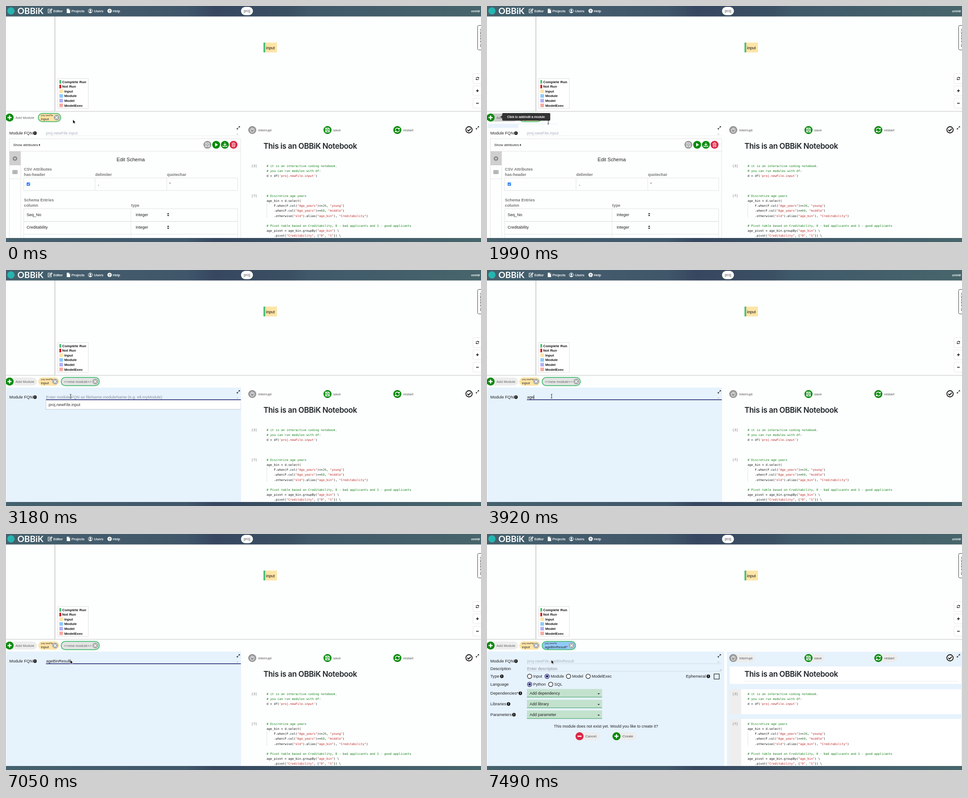
An HTML page for the animation above (8000 ms loop, 1059 by 529 pixels).

```html
<!DOCTYPE html>
<html lang="en">
<head>
<meta charset="utf-8">
<title>Notebook editor</title>
<style>
html, body { margin: 0; width: 100%; height: 100%; overflow: hidden; background: #fdfffe; }
svg { display: block; width: 100vw; height: 100vh; }
text { font-family: "Liberation Sans", Arial, sans-serif; white-space: pre; }
.b { font-weight: 700; }
.m { font-weight: 500; stroke: #fff; stroke-width: .2; }
.code { font-family: "DejaVu Sans Mono", monospace; }
.title { font-family: Inter, sans-serif; font-weight: 600; letter-spacing: -.4px; }
.brand { font-family: Lato, sans-serif; font-weight: 700; }
</style>
</head>
<body>
<svg id="stage" viewBox="0 0 1059 529"></svg>
<script>
const LOOP = 8000, GREEN = '#078a0b', RED = '#dc2647', BLUE = '#e6f2fc', NAVY = '#16166b', RING = '#52bf7c';
const stage = document.getElementById('stage');

// y is the middle of the capitals
const text = (x, y, s, size = 9, fill = '#222', more = '') =>
  `<text x="${x}" y="${(y + size * .36).toFixed(2)}" font-size="${size}" fill="${fill}" ${more}>${s}</text>`;
const rect = (x, y, w, h, fill = 'none', more = '') =>
  `<rect x="${x}" y="${y}" width="${w}" height="${h}" fill="${fill}" ${more}/>`;
const circle = (x, y, r, fill, more = '') => `<circle cx="${x}" cy="${y}" r="${r}" fill="${fill}" ${more}/>`;
const path = (d, stroke, width = 1, fill = 'none') =>
  `<path d="${d}" stroke="${stroke}" stroke-width="${width}" fill="${fill}"/>`;
const at = (x, y, s, scale = 1) => `<g transform="translate(${x} ${y}) scale(${scale})">${s}</g>`;
const during = (from, to, s) => `<g data-from="${from}" data-to="${to}">${s}</g>`;
const esc = s => s.replace(/&/g, '&amp;').replace(/</g, '&lt;');

const icons = {
  plus: 'M-4.5 0H4.5M0-4.5V4.5',
  minus: 'M-4.5 0H4.5',
  refresh: 'M-4.5-.5A4.5 4.5 0 0 1 3.2-3M4.5-5V-2H1.5M4.5 .5A4.5 4.5 0 0 1-3.2 3M-4.5 5V2H-1.5',
  save: 'M-4.5-4.5H3L4.5-3V4.5H-4.5ZM-2.3-4.5V-1.5H2V-4.5M-2.5 4.5V1H2.5V4.5',
  hand: 'M-4 1V-2.5M-2-.5V-4.5M0-.5V-5M2-.5V-4.5M4 1V-3M-4 1Q-4 5 0 5T4 1',
  play: 'M-1.5-3L3 0L-1.5 3Z',
  download: 'M0-5V1M-3-1.5L0 1.5L3-1.5M-4.5 1.5V4H4.5V1.5',
  trash: 'M-4-3H4M-1.5-4.5H1.5M-3-3V4.5H3V-3M-1-1V3M1-1V3'
};
const button = (x, y, r, fill, icon, width = 1.3) =>
  circle(x, y, r, fill) + at(x, y, path(icons[icon], '#fff', width, icon == 'play' ? '#fff' : 'none'));
const pill = (x, y, w, fill = '#ededed') => rect(x, y - 9, w, 18, fill, 'rx="9"');
const info = (x, y) => circle(x, y, 3.9, '#161616') + text(x, y, 'i', 6.5, '#fff', 'class="b" text-anchor="middle"');
const expand = (x, y) => at(x, y,
  path('M-2.6 2.6L2.6-2.6', '#222', 1) + path('M.3-3.5H3.5V-.3ZM-3.5.3V3.5H-.3Z', 'none', 0, '#111'));
const label = (x, y, s, infoX) => text(x, y, s, 9.2) + (infoX ? info(infoX, y) : '');

function chip(x, w, name, fill, ring, small) {
  const tx = x + 7;
  return rect(x + 1, 240.8, w - 2, 18.4, fill, `rx="9.2" ${ring ? `stroke="${RING}" stroke-width="2"` : ''}`)
    + (small ? text(tx, 244.7, 'proj.newFile', 5, '#333') + text(tx, 253, name, 8) : text(tx, 250, name, 8, '#666'))
    + circle(x + w - 10, 250, 6.5, '#a9acaf')
    + at(x + w - 10, 250, path('M-2.8-2.8L2.8 2.8M2.8-2.8L-2.8 2.8', '#fff', 1.4));
}

function header() {
  const nav = [['Editor', 105.5], ['Projects', 146], ['Users', 196], ['Help', 238]];
  return rect(0, 0, 1059, 23.5, 'url(#bar)') + circle(11, 11, 8, '#25b5b0')
    + text(25.5, 11, 'OBBiK', 19, '#fff', 'class="brand"')
    + nav.map(([s, x]) => text(x, 11, s, 8, '#fff', 'class="m"')).join('')
    + path('M99 7H94V15.5H101V11.5M97 12.5L97.5 10.5L101.5 6L103 7.5L99 12Z', '#fff', 1.2)
    + path('M135.5 6H140V9H143V16H135.5ZM141 6L143 8H141Z', 'none', 0, '#fff')
    + circle(188, 11, 4.6, 'none', 'stroke="#fff" stroke-width="1"') + circle(188, 9.8, 2, '#fff')
    + path('M184.6 14Q188 10.5 191.4 14Q188 17 184.6 14Z', 'none', 0, '#fff')
    + circle(231, 11, 4.8, '#fff') + text(231, 11, '?', 8, '#3d5467', 'class="b" text-anchor="middle"')
    + rect(524, 2, 26.5, 18.5, '#fff', 'rx="9.2"') + text(537.2, 11, 'proj', 8.5, '#555', 'text-anchor="middle"')
    + text(1057, 11, 'onmir', 8, '#fff', 'class="m" text-anchor="end"');
}

function graph() {
  const legend = [['Complete Run', '#4fc07c'], ['Not Run', '#d8191f'], ['Input', '#fee4a6'],
    ['Module', '#8fcaf8'], ['Model', '#b2b0f8'], ['ModelExec', '#f6aaa1']];
  const zoom = y => rect(1041, y - 11, 24, 22, '#fff', 'rx="3" stroke="#e6e6e6"');
  return rect(108, 23.5, 2, 212, '#cfcfcf') + rect(0, 235.5, 1059, 1.2, '#cbcbcb')
    + rect(574, 82, 30, 22, '#fee4a6') + rect(574, 82, 4, 22, RING) + text(579.8, 93.5, 'input', 9, '#111')
    + rect(115.5, 162.5, 68, 67, '#fff', 'stroke="#dedede"')
    + legend.map(([s, c], i) => {
      const y = 170 + i * 10.55, wide = i > 1;
      return rect(119, y - 4, wide ? 8 : 4, 8, c) + text(wide ? 130 : 125.3, y, s, 7.9, '#111', 'class="b"');
    }).join('')
    + rect(1051.5, 43.5, 20, 55, '#fff', 'rx="3" stroke="#444"')
    + `<g transform="translate(1059 92) rotate(-90)">${text(0, 0, 'RUNTIMES', 8)}</g>`
    + zoom(162.5) + zoom(190) + zoom(218)
    + at(1051, 162.5, path(icons.refresh, '#222', 1.8), .65)
    + path('M1048 190H1054M1051 187V193M1048 218H1054', '#111', 1.5);
}

const colour = line => line[0] == '#' ? `<tspan fill="#0a7d10">${esc(line)}</tspan>`
  : esc(line).replace(/("[^"]*"|'[^']*')|\b(\d+)\b/g, (m, str) => `<tspan fill="${str ? '#ba2121' : '#1a7a1a'}">${m}</tspan>`);

function notebook() {
  const cell1 = ['# it is an interactive coding notebook.', '# you can run modules with df:', "d = df('proj.newFile.input')"];
  const cell2 = ['# Discretize age years', 'age_bin = d.select(',
    '    F.when(F.col("Age_years")<=26, "young")', '    .when(F.col("Age_years")<=60, "middle")',
    '    .otherwise("old").alias("age_bin"), "Creditability")', '',
    '# Pivot table based on Creditability, 0 - bad applicants and 1 - good applicants',
    'age_pivot = age_bin.groupBy("age_bin") \\', '    .pivot("Creditability", ["0", "1"]) \\'];
  const lines = (list, y) => list.map((s, i) => text(581, y + i * 11.17, colour(s), 6.71, '#111', 'class="code"')).join('');
  const count = (y, s) => text(547, y, s, 7.1, '#666', 'class="code"');
  const box = (y, h) => rect(541, y, 516, h, '#fff') + rect(541, y, 25.5, h, '#eeeeee');
  return during(7190, LOOP, rect(535, 264, 524, 260, BLUE) + rect(541, 297, 516, 39, '#fff')
      + rect(574, 329.5, 477, 1, '#eee') + box(348, 56) + box(414.5, 120)
      + pill(541, 278, 57) + pill(709, 278, 43) + pill(864, 278, 51))
    + button(549, 278, 9, '#999', 'hand', 1.1) + text(562.5, 278, 'interrupt', 8, '#555')
    + button(716.8, 278, 9, GREEN, 'save') + text(729.5, 278, 'save', 8, '#555')
    + button(872.5, 278, 9, GREEN, 'refresh', 1.6) + text(885.5, 278, 'restart', 8, '#555')
    + circle(1032.3, 277.5, 7, '#fff', 'stroke="#111" stroke-width="1.8"')
    + path('M1028.6 277.5L1031.3 280.3L1036.2 274.8', '#111', 2) + expand(1051, 273)
    + text(574, 314, 'This is an OBBiK Notebook', 17, '#212529', 'class="title"')
    + count(358.3, '[3]') + lines(cell1, 358.3) + count(425.5, '[7]') + lines(cell2, 425.5)
    + rect(581, 442, .8, 33, '#ddd');
}

function schema() {
  const line = '#e2e2e2', head = (x, y, s) => text(x, y, s, 8.9, '#777', 'class="b"');
  const row = (y, s) => text(46, y, s) + text(289, y, 'Integer')
    + path(`M359 ${y - 1}L361.5 ${y - 4}L364 ${y - 1}ZM359 ${y + 1}L361.5 ${y + 4}L364 ${y + 1}Z`, 'none', 0, '#222');
  const frame = (x, y, w, h) => rect(x, y, w, h, 'none', `stroke="${line}"`);
  return text(89, 285, 'proj.newFile.input', 9, '#a8b0c4') + rect(89, 290.5, 434, .7, '#e4e4e4')
    + frame(7.5, 297.5, 515.5, 28) + frame(7.5, 325.5, 515.5, 210)
    + text(16, 311.5, 'Show attributes', 8) + path('M75.5 309L72.5 311.5L75.5 314Z', 'none', 0, '#222')
    + button(449, 311, 8.8, '#999', 'save', 1) + button(468.5, 311, 8.8, GREEN, 'play')
    + button(488, 311, 8.8, GREEN, 'download') + button(507.3, 311, 8.8, RED, 'trash', 1)
    + rect(8, 326, 25, 31, '#cfcfcf') + rect(8, 387, 25, .8, line) + rect(32.5, 326, .8, 200, line)
    + circle(20, 342, 3.6, 'none', 'stroke="#888" stroke-width="3"') + circle(20, 342, 2, '#cfcfcf')
    + path('M15 368.5H25V376H15ZM15 371H25M15 373.5H25M18.3 368.5V376M21.6 368.5V376', '#777', .9)
    + text(278, 343.5, 'Edit Schema', 11.1, '#222', 'text-anchor="middle"')
    + head(40, 366, 'CSV Attributes') + head(40, 378, 'has-header') + head(199, 378, 'delimiter') + head(359, 378, 'quotechar')
    + frame(39.5, 385.5, 477, 28) + frame(198.5, 385.5, 160, 28)
    + rect(46, 395.5, 7.6, 7.6, '#2f80ee', 'rx="1.5"') + path('M47.8 399.4L49.4 401L52 397.5', '#fff', 1.1)
    + text(205, 399, ',', 9) + text(364, 399, '"', 9)
    + head(40, 435, 'Schema Entries') + head(40, 447, 'column') + head(279, 447, 'type')
    + frame(39.5, 454.5, 477, 28.5) + frame(39.5, 483, 477, 28.5) + frame(39.5, 511.5, 477, 28)
    + rect(278, 454.5, .8, 70, line) + row(467.5, 'Seq_No') + row(496, 'Creditability');
}

const fieldArrow = path('M513.5 286.5H518.5L516 289Z', 'none', 0, '#c2c6ca');

function newModule() {
  return `<g id="fade">${rect(1, 263.5, 523, 260, BLUE)}</g>`
    + label(7.5, 285, 'Module FQN', 64.5)
    + during(2140, 3480, text(89.5, 285, 'Enter module FQN as fileName.moduleName (e.g. etl.myModule)', 8.95, '#8a929c'))
    + during(2140, 2440, rect(89, 290.5, 434, .7, '#c8d0d6'))
    + during(2440, 7190, rect(89, 290, 434.5, 1.5, NAVY))
    + during(2580, 3480, rect(88.5, 292.5, 435, 20.5, '#c6ced5') + rect(89.5, 292, 433.5, 19.8, '#fff')
      + text(95, 301.5, 'proj.newFile.input', 9, '#333'))
    + fieldArrow
    + text(89.5, 285, '', 9, '#222', 'id="typed"') + rect(89, 280.3, .9, 9.4, '#222', 'id="caret"');
}

function moduleForm() {
  const radio = (x, y, s, on) => circle(x, y, 4.9, '#fff', `stroke="${on ? NAVY : '#222'}" stroke-width="1.2"`)
    + (on ? circle(x, y, 2.8, NAVY) : '') + text(x + 8, y, s);
  const select = (y, s) => rect(89, y - 9.5, 167.5, 18.5, '#c3e2cd') + rect(89, y + 8, 167.5, 1.2, '#4aa56c')
    + text(95, y, s) + path(`M246.3 ${y}H251.7L249 ${y + 2.8}Z`, 'none', 0, '#333');
  const dotted = y => `<path d="M89 ${y}H523" stroke="#b9c2c9" stroke-width=".9" stroke-dasharray="1 1"/>`;
  return rect(1, 263.5, 528, 260, BLUE) + label(7.5, 285, 'Module FQN', 64.5)
    + text(89.5, 285, 'proj.newFile.ageBinResult', 9, '#a9b3bf') + dotted(290.8) + fieldArrow
    + label(7.5, 302, 'Description') + text(89.5, 302, 'Enter description', 9, '#8a929c') + dotted(307.5)
    + path('M519 306.5L523 302.5M521.5 306.5L523 305', '#888', .7)
    + label(7.5, 319, 'Type', 33) + radio(95, 319, 'Input') + radio(134, 319, 'Module', true)
    + radio(181.7, 319, 'Model') + radio(225.5, 319, 'ModelExec')
    + label(443.5, 319, 'Ephemeral', 493.5) + rect(506.2, 313.7, 11.5, 11.5, 'none', 'stroke="#222" stroke-width="1.2"')
    + label(7.5, 337, 'Language') + radio(95, 337, 'Python', true) + radio(142, 337, 'SQL')
    + label(7.5, 357, 'Dependencies*', 74.3) + select(357, 'Add dependency')
    + label(7.5, 381, 'Libraries', 48) + select(381, 'Add library')
    + label(7.5, 405, 'Parameters', 60) + select(405, 'Add parameter')
    + text(149, 430.5, 'This module does not exist yet. Would you like to create it?', 8.94)
    + pill(198, 453.3, 53) + button(206.3, 453.3, 9, RED, 'minus', 2.5) + text(219, 453.3, 'Cancel', 8, '#555')
    + pill(280, 453.3, 54) + button(288.7, 453.3, 9, GREEN, 'plus', 2.5) + text(302, 453.3, 'Create', 8, '#555');
}

const tooltip = rect(34, 240, 107, 17, '#333', 'rx="2"') + path('M30 248.5L34 245V252Z', 'none', 0, '#333')
  + text(45, 248.3, 'Click to add/edit a module', 7.3, '#fff', 'class="m"');

stage.innerHTML = `<defs><linearGradient id="bar">${
  [[0, '#45616d'], [.38, '#40566a'], [.44, '#36475f'], [.6, '#3b5063'], [.64, '#40596a'], [1, '#47656b']]
    .map(([o, c]) => `<stop offset="${o}" stop-color="${c}"/>`).join('')}</linearGradient></defs>`
  + graph()
  + `<g id="lower">`
  + during(800, 2140, pill(2, 250, 67, '#cccccc')) + during(2140, LOOP, pill(2, 250, 67))
  + text(21, 250, 'Add Module', 7.9, '#666') + button(8, 250, 9, GREEN, 'plus', 2.5)
  + during(0, 2140, chip(71, 52, 'input', '#fee4a6', true, true) + label(7.5, 285, 'Module FQN', 64.5) + schema() + fieldArrow)
  + during(1990, 2140, rect(2, 264, 68, 9.5, '#e9f2fc') + rect(70, 263.5, 87, 1.5, '#edf4fc'))
  + during(2140, LOOP, chip(71, 48.5, 'input', '#fee4a6', false, true))
  + during(2140, 7190, chip(122, 87, '&lt;&lt;new module&gt;&gt;', '#e4e4e4', true) + newModule())
  + during(7490, LOOP, chip(122, 76.5, 'ageBinResult*', '#92caf8', true, true) + moduleForm())
  + expand(518, 273) + notebook() + '</g>'
  + during(1390, 1540, `<g opacity=".5">${tooltip}</g>`) + during(1540, 2140, tooltip)
  + header() + rect(0, 520, 1059, 9, 'url(#bar)')
  + `<g id="arrow">${path('M0 0V9L2.1 7.1L3.6 10.3L5.2 9.6L3.7 6.5H6.5Z', '#fff', .8, '#000')}</g>`
  + `<g id="beam">${path('M-1.5-4.5Q0-4.5 0-3.5Q0-4.5 1.5-4.5M0-3.5V3.5M-1.5 4.5Q0 4.5 0 3.5Q0 4.5 1.5 4.5', '#222', 1)}</g>`
  + `<g id="point">${path('M0 0Q1.5-1 2 .5V4L6 5Q7.5 5.5 7 7.5L6 11H1L-2.5 7Q-2.5 5 0 6.5Z', '#111', .8, '#fff')}</g>`;

const $ = id => document.getElementById(id);
const timed = [...stage.querySelectorAll('[data-from]')];
const show = (el, on) => { el.style.display = on ? '' : 'none'; };
const last = (keys, t) => keys.filter(k => k[0] <= t).pop();

const moves = [[0, 'arrow', 149, 254.5], [300, 'arrow', 134, 259], [470, 'arrow', 94, 261], [630, 'arrow', 60, 257],
  [800, 'point', 42, 255], [1990, 'beam', 136.5, 260.5], [2140, 'beam', 144, 283], [7050, 'arrow', 143.3, 282]];
const typing = [[0, 0], [3480, 1], [3770, 2], [3920, 3], [4360, 4], [4510, 5], [4660, 6],
  [4960, 7], [5110, 8], [5250, 9], [5400, 10], [5550, 12]];

function draw(now) {
  const t = now % LOOP;
  for (const el of timed) show(el, t >= +el.dataset.from && t < +el.dataset.to);
  $('lower').setAttribute('transform', `translate(0 ${t >= 7190 && t < 7490 ? -2.4 : 0})`);
  $('fade').setAttribute('opacity', t < 2290 ? .4 : t < 2440 ? .75 : 1);

  const typed = $('typed');
  typed.textContent = 'ageBinResult'.slice(0, last(typing, t)[1]);
  const caretOn = t >= 2580 && !(t >= 3180 && t < 3480) && !(t >= 6150 && t < 6600);
  show($('caret'), caretOn);
  if (caretOn) $('caret').setAttribute('x', 89.2 + (typed.textContent ? typed.getComputedTextLength() : 0));

  const [, kind, x, y] = last(moves, t);
  for (const id of ['arrow', 'beam', 'point']) show($(id), id == kind);
  $(kind).setAttribute('transform', `translate(${x} ${y})`);
  requestAnimationFrame(() => draw(performance.now()));
}
draw(performance.now());
</script>
</body>
</html>
```
